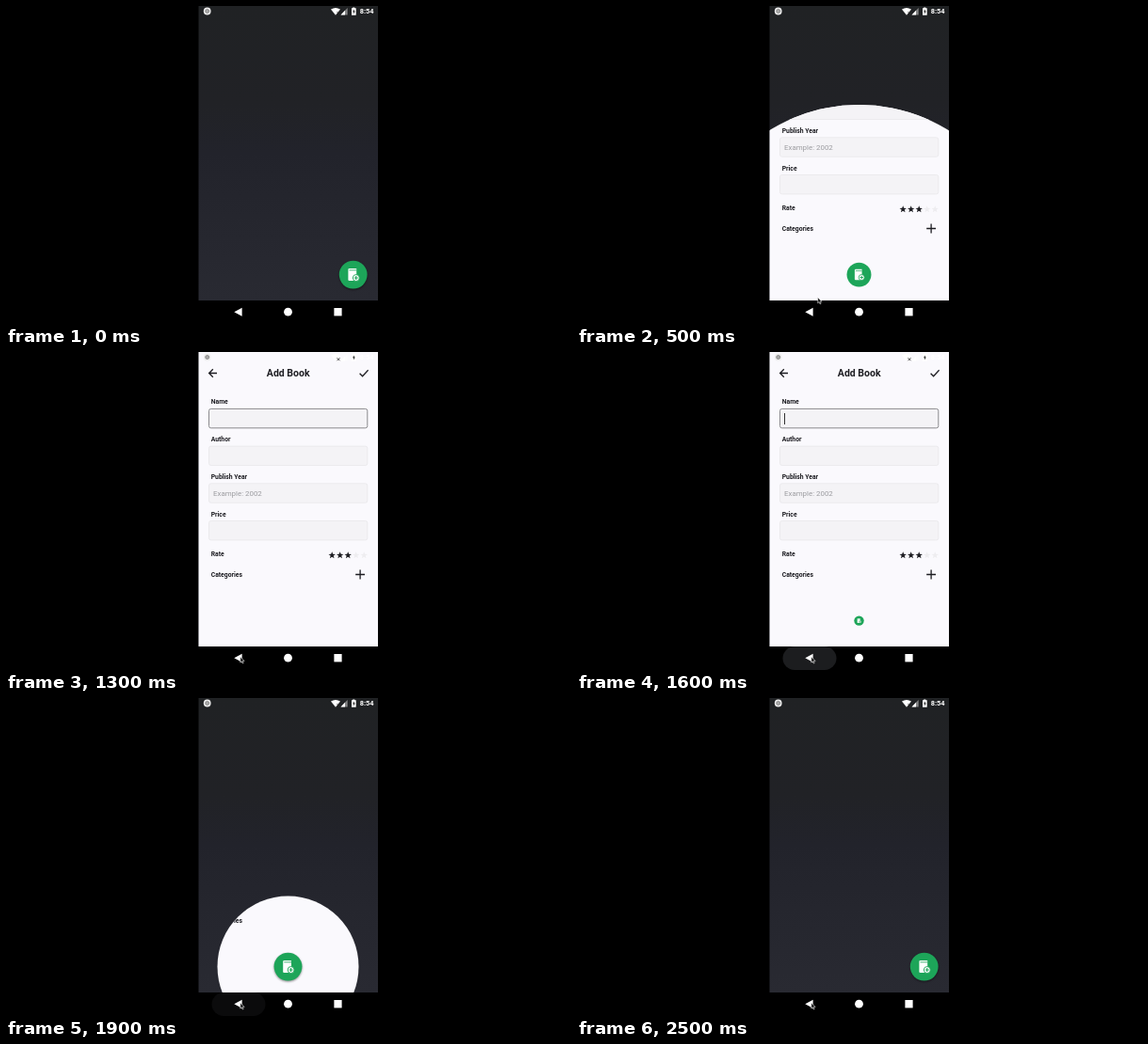
An HTML page that plays this animation: 600 by 338 pixels, repeating every 2.6 s.

```html
<!DOCTYPE html>
<html lang="en">
<head>
<meta charset="utf-8">
<title>Add Book</title>
<style>
  html, body { margin: 0; height: 100%; overflow: hidden; background: #000; }
  svg { display: block; width: 100%; height: 100%; font-family: Roboto, sans-serif; }
  .label { font-size: 6.8px; font-weight: 700; }
  .hint { font-size: 7.9px; fill: #9c9ca0; }
  .line { fill: none; stroke: #1d1d22; stroke-width: 1.3; }
  .field { fill: #f4f3f6; stroke: #ebeaed; }
</style>
</head>
<body>
<svg viewBox="0 0 600 338">
  <defs>
    <linearGradient id="night" x2="0" y2="1">
      <stop stop-color="#202224"/>
      <stop offset=".33" stop-color="#212226"/>
      <stop offset=".5" stop-color="#22232b"/>
      <stop offset="1" stop-color="#292a32"/>
    </linearGradient>
    <clipPath id="reveal"><circle id="hole" cx="299.5" cy="285.5"/></clipPath>
  </defs>
  <rect width="600" height="338"/>
  <rect x="204.5" width="190.5" height="313" fill="url(#night)"/>

  <g clip-path="url(#reveal)" fill="#1d1d22">
    <rect x="204.5" width="190.5" height="313" fill="#faf9fd"/>
    <path class="line" d="M224 22.5H215.8M219.8 18.3L215.6 22.5L219.8 26.7"/>
    <path class="line" d="M375.6 22.8L378.6 25.8L384.6 19.3"/>
    <text x="299.7" y="26.4" text-anchor="middle" font-size="10.5" font-weight="700">Add Book</text>
    <g id="form"></g>
    <text class="hint" x="220" y="153.2">Example: 2002</text>
    <text class="label" x="217.7" y="217.2">Rate</text>
    <g id="stars"></g>
    <text class="label" x="217.7" y="238.7">Categories</text>
    <path class="line" d="M371.2 236.5H381M376.1 231.6V241.4"/>
    <path id="caret" d="M220.5 65V77" stroke="#333"/>
  </g>

  <g fill="#fff">
    <circle cx="213.7" cy="5.5" r="3.9" fill="#eee"/>
    <circle cx="213.7" cy="5.5" r="2" fill="#aaa" stroke="#777" stroke-width=".7"/>
    <path d="M345 3.6Q350 .4 355 3.6L350 9.7Z"/>
    <path d="M351.5 6.2L354.5 9.2M354.5 6.2L351.5 9.2" stroke="#222" stroke-width=".8"/>
    <path d="M362.7 2V9.5H355.5Z" opacity=".45"/>
    <path d="M360 4.8V9.5H355.5Z"/>
    <path d="M367 2.3H368.3V1.4H370.3V2.3H371.7V9.7H367Z"/>
    <path d="M369.8 3.4L368 6.3H369.2V8.5L370.8 5.5H369.8Z" fill="#222"/>
    <text x="375.8" y="8.3" font-size="7.4" font-weight="700">8:54</text>
  </g>

  <g id="fab">
    <circle r="14.9" fill="#1da559"/>
    <path d="M-4.2 -6.6H3.5V6.5H-4.2Q-5.3 6.5 -5.3 5.4V-5.5Q-5.3 -6.6 -4.2 -6.6Z" fill="#fff"/>
    <path d="M-4.2 -4.8H3.5" stroke="#1da559" stroke-width=".8"/>
    <circle cx="3.1" cy="3.4" r="3.5" fill="#fff" stroke="#1da559" stroke-width=".9"/>
    <path d="M1.1 3.4H5.1M3.1 1.4V5.4" stroke="#1da559" stroke-width="1.1"/>
  </g>

  <rect x="204.5" y="313" width="190.5" height="25"/>
  <rect id="ripple" x="218.5" y="313" width="57" height="25" rx="12.5" fill="#1c1d1f"/>
  <g fill="#fff">
    <path d="M242.3 325.2L250.6 320.7V329.7Z"/>
    <circle cx="299.5" cy="325.2" r="4.4"/>
    <rect x="348.4" y="321" width="8.2" height="8.4"/>
  </g>
  <path id="pointer" d="M0 0V6L1.4 4.8L2.4 7L3.4 6.5L2.5 4.4H4.3Z" fill="#111" stroke="#fff" stroke-width=".55"/>
</svg>
<script>
const LOOP = 2600, STEP = 100;
const $ = id => document.getElementById(id);
const set = (id, name, value) => $(id).setAttribute(name, value);

$("form").innerHTML = ["Name", "Author", "Publish Year", "Price"].map((name, i) => {
  const y = 55.4 + i * 39.7;
  const focus = i ? "" : ' style="stroke:#8b8b8e"';
  return `<text class="label" x="217.7" y="${y}">${name}</text>
    <rect class="field" x="215.5" y="${y + 5}" width="168.3" height="20.4" rx="2.2"${focus}/>`;
}).join("");

function star(cx, cy, r) {
  return Array.from({ length: 10 }, (_, i) => {
    const a = (i / 5 - .5) * Math.PI, d = i % 2 ? r * .42 : r;
    return `${cx + d * Math.cos(a)},${cy + d * Math.sin(a)}`;
  }).join(" ");
}
$("stars").innerHTML = [0, 1, 2, 3, 4].map(i =>
  `<polygon points="${star(346.2 + i * 8.5, 216.1, 3.9)}" fill="${i < 3 ? "#1d1d22" : "#eeedf0"}"/>`).join("");

// Piecewise linear value from [time, value] pairs
function track(t, ...keys) {
  if (t <= keys[0][0]) return keys[0][1];
  for (let i = 1; i < keys.length; i++) {
    const [t0, v0] = keys[i - 1], [t1, v1] = keys[i];
    if (t <= t1) return v0 + (v1 - v0) * (t - t0) / (t1 - t0);
  }
  return keys[keys.length - 1][1];
}

function ease(t, from, to) {
  const p = Math.min(1, Math.max(0, (t - from) / (to - from)));
  return p < .5 ? 4 * p ** 3 : 1 - 4 * (1 - p) ** 3;
}

function draw(t) {
  set("hole", "r", track(t, [300, 0], [400, 65], [500, 180.5], [600, 330],
    [1700, 340], [1800, 210.5], [1900, 75], [2000, 0]));

  const x = 368.7 - 69.2 * (ease(t, 0, 350) - ease(t, 2000, 2500));
  const scale = track(t, [400, 1], [500, .87], [600, .3], [700, 0],
    [1500, 0], [1600, .35], [1700, .8], [1800, 1]);
  set("fab", "transform", `translate(${x} 285.6) scale(${scale})`);
  $("fab").style.filter = scale > .95 ? "drop-shadow(0 1px 1px rgba(0,0,0,.45))" : "none";

  set("caret", "opacity", t < 850 || t >= 1350 ? 1 : 0);
  set("ripple", "opacity", track(t, [1400, 0], [1600, 1], [1800, 1], [1900, .4], [2000, .08], [2100, 0]));

  const px = track(t, [400, 265], [500, 255.7], [900, 247.2], [1300, 248.8]);
  const py = track(t, [400, 305], [500, 309.8], [900, 321.5], [1300, 324]);
  set("pointer", "transform", `translate(${px} ${py})`);
  set("pointer", "opacity", t < 400 ? 0 : 1);
}

function frame() {
  draw(Math.floor(performance.now() % LOOP / STEP) * STEP);
  requestAnimationFrame(frame);
}
frame();
</script>
</body>
</html>
```
